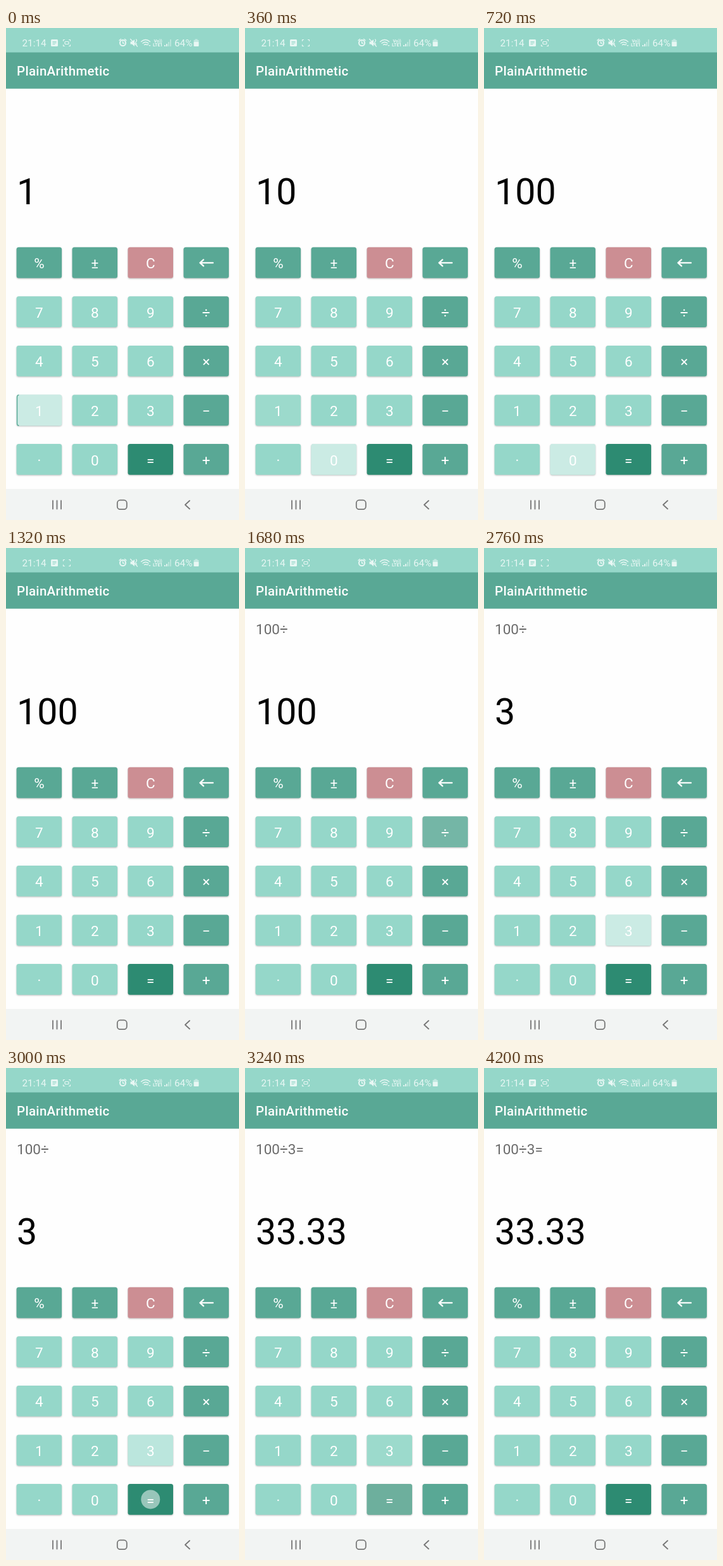
An HTML page that plays this animation: 368 by 776 pixels, repeating every 4320 ms.

```html
<!DOCTYPE html>
<html lang="en">
<head>
<meta charset="utf-8">
<title>Calculator</title>
<style>
  html, body { margin: 0; width: 100%; height: 100%; overflow: hidden; background: #fefefe; }
  svg { display: block; width: 368px; height: 776px; font-family: Roboto, sans-serif; }
  .key { filter: drop-shadow(0 1px 1px rgba(0, 0, 0, .25)); }
  .label { font-size: 22.5px; fill: #fff; text-anchor: middle; }
  .line { fill: none; stroke-linecap: round; stroke-linejoin: round; }
</style>
</head>
<body>
<svg id="stage" viewBox="0 0 368 776">
  <rect width="368" height="776" fill="#fefefe"/>
  <rect width="368" height="39" fill="#95d7c9"/>
  <rect y="38.5" width="368" height="57.2" fill="#59a895"/>
  <text x="17" y="75" font-size="20.44" font-weight="500" letter-spacing=".33" fill="#fff">PlainArithmetic</text>

  <!-- status bar -->
  <g fill="#e8f7f4" stroke="#e8f7f4" stroke-width="0">
    <text x="25.5" y="29" font-size="15.3">21:14</text>
    <rect x="71" y="18" width="11" height="11" rx="1.5"/>
    <path d="M73.5 21.5h6M73.5 23.5h6M73.5 25.7h4" stroke="#95d7c9" stroke-width="1"/>
    <path class="line" stroke-width="1.1" d="M90.5 20.5v-2h2M99.5 18.5h2v2M101.500 26.500v2h-2M92.500 28.500h-2v-2"/>
    <rect id="recording" x="93" y="21.5" width="6" height="4" rx="1" fill="none" stroke-width="1.2"/>
    <circle cx="184.500" cy="23.500" r="4.500" fill="none" stroke-width="2"/>
    <path class="line" stroke-width="1.4" d="M184.500 21v3h2M179 19.500l2.500-2M190 19.500l-2.500-2"/>
    <path d="M196.500 21.500h2.500l4-3.500v11l-4-3.500h-2.500z"/>
    <path class="line" stroke-width="1.2" d="M196.500 17.500l11 11.500M205.500 18q2 1.500 0 3.500t1 4"/>
    <path class="line" stroke-width="1.4" d="M213.500 21.500q7-6 14 0M216 24q4.500-3.500 9 0M218.500 26.500q2-1.500 4 0"/>
    <path d="M222.500 27l1.500-2 1.500 2zM225.500 27h3l-1.500 2z"/>
    <g font-size="7" font-weight="700">
      <text x="233.500" y="22.500">Vo))</text>
      <text x="232" y="29">LTE1</text>
    </g>
    <path d="M250 29v-2h1.800v2zM253 29v-4h1.800v4z"/>
    <path d="M256 29v-7h1.800v7zM259 29v-11h1.800v11z" opacity=".5"/>
    <text x="266" y="29" font-size="15.3">64%</text>
    <path d="M296.500 19h2v-1.500h4v1.500h2v4h-8z" opacity=".55"/>
    <rect x="296.500" y="22" width="8" height="7" rx="1"/>
  </g>

  <text id="expression" x="17" y="136" font-size="22.500" fill="#6b6b6b"></text>
  <text id="result" x="17" y="278" font-size="57.300" fill="#000"></text>
  <g id="keys"></g>
  <path id="rim" class="line" stroke="#59a895" stroke-width="1.300" d="M20 578.800Q17.600 578.800 17.600 582V624Q17.600 627 20 627"/>

  <!-- navigation bar -->
  <rect y="727" width="368" height="49" fill="#f2f4f3"/>
  <g class="line" stroke="#777" stroke-width="1.800">
    <path d="M74 745.500v13M80.500 745.500v13M87 745.500v13M290 745.500l-7 6.500 7 6.500"/>
    <rect x="175.800" y="744.700" width="15" height="14.500" rx="4.500"/>
  </g>
</svg>
<script>
const LOOP = 4320, STEP = 120, GROW = 120, FADE = 410;
const LIGHT = '#95d7c9', MID = '#59a895';
const rows = ['%±C←', '789÷', '456×', '123−', '·0=+'];
const special = { C: '#cc8e93', '=': '#2d8b72' };

// key, touch time, release time
const presses = [
  ['1', -300, 0], ['0', 240, 380], ['0', 600, 740],
  ['÷', 1360, 1400], ['3', 2520, 2880], ['=', 3000, 3076]
];
const results = [[0, '1'], [360, '10'], [720, '100'], [2640, '3'], [3120, '33.33']];
const expressions = [[0, ''], [1440, '100÷'], [3120, '100÷3=']];
const recordingHidden = [[240, 480], [960, 1440], [2040, 2400], [2640, 3000], [3600, 4200]];

const byId = id => document.getElementById(id);
const ripples = {};

function add(parent, tag, attributes, text = '') {
  const node = document.createElementNS('http://www.w3.org/2000/svg', tag);
  for (const name in attributes) node.setAttribute(name, attributes[name]);
  node.textContent = text;
  return parent.appendChild(node);
}

rows.forEach((row, r) => [...row].forEach((key, c) => {
  const x = 16.6 + c * 87.95, y = 345.7 + r * 77.6;
  const box = { x, y, width: 71.5, height: 48.7, rx: 3.5 };
  const fill = special[key] || (/[0-9·]/.test(key) ? LIGHT : MID);
  add(byId('keys'), 'rect', { ...box, fill, class: 'key' });
  ripples[key] = add(byId('keys'), 'rect', { ...box, fill: '#fff', opacity: 0 });
  if (key === '←') {
    add(byId('keys'), 'path', {
      class: 'line', stroke: '#fff', 'stroke-width': 2.3,
      d: `M${x + 46.5} ${y + 24.7}h-20.500m5.500 -5l-5.500 5 5.500 5`
    });
  } else {
    add(byId('keys'), 'text', { x: x + 35.8, y: y + 33.5, class: 'label' }, key);
  }
}));

const clamp = v => Math.max(0, Math.min(1, v));
const latest = (list, t) => list.filter(([start]) => start <= t).pop()[1];

function draw(t) {
  byId('result').textContent = latest(results, t);
  byId('expression').textContent = latest(expressions, t);
  const hidden = recordingHidden.some(([from, to]) => t >= from && t < to);
  byId('recording').setAttribute('opacity', hidden ? 0 : 1);
  byId('rim').setAttribute('opacity', t < STEP ? 1 : 0);

  for (const key in ripples) {
    const press = presses.filter(([k, start]) => k === key && start <= t).pop();
    const [, start, release] = press || [key, 0, -FADE];
    ripples[key].setAttribute('opacity', 0.51 * clamp(1 - (t - release) / FADE));
    ripples[key].style.clipPath = `circle(${15 + 30 * clamp((t - start) / GROW)}px)`;
  }
}

function tick() {
  draw(Math.floor(performance.now() % LOOP / STEP) * STEP);
  requestAnimationFrame(tick);
}
tick();
</script>
</body>
</html>
```
